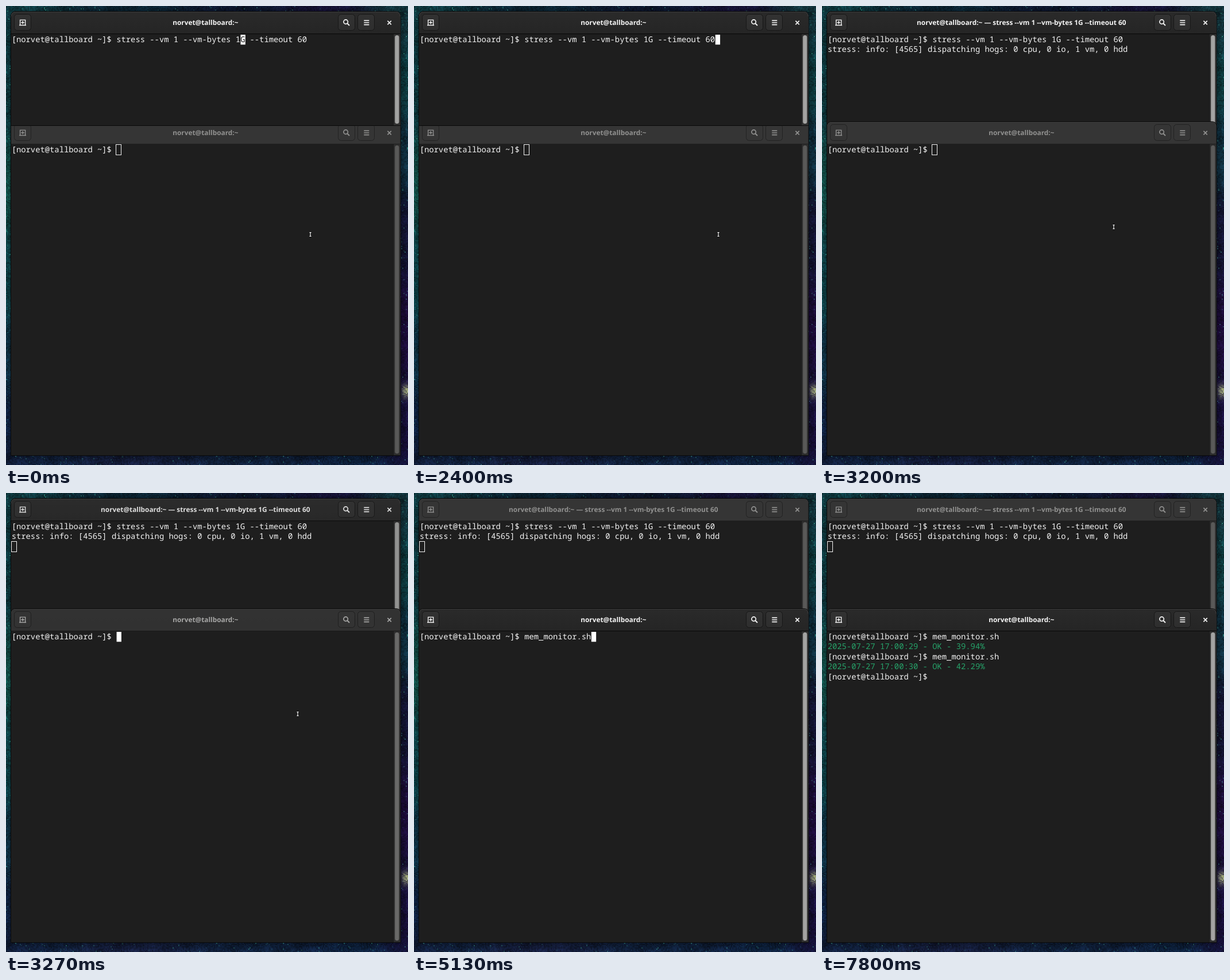
An HTML page with a canvas for the animation above (8000 ms loop, 700 by 800 pixels).

```html
<!DOCTYPE html>
<html lang="en">
<head>
<meta charset="utf-8">
<title>Terminals</title>
<style>
html, body { margin: 0; width: 100%; height: 100%; overflow: hidden; background: #10182c; }
canvas, svg { position: absolute; left: 0; top: 0; width: 700px; height: 800px; display: block; }
text { white-space: pre; text-rendering: geometricPrecision; }
.mono { font: 13.84px "Noto Sans Mono", monospace; fill: #f4f4f4; }
.title { font: 700 11.85px "Noto Sans", sans-serif; text-anchor: middle; }
</style>
</head>
<body>
<canvas id="wall" width="700" height="800"></canvas>
<svg id="stage" viewBox="0 0 700 800">
  <defs>
    <linearGradient id="bar" x2="0" y2="1"><stop stop-color="#2a2a2a"/><stop offset="1" stop-color="#252525"/></linearGradient>
    <linearGradient id="btn" x2="0" y2="1"><stop stop-color="#323232"/><stop offset="1" stop-color="#2e2e2e"/></linearGradient>
  </defs>
  <g id="windows"></g>
  <g id="mouse">
    <path d="M-2 -3.5H2M0 -3.5V3.5M-2 3.5H2" stroke="#000" stroke-width="2.6" fill="none"/>
    <path d="M-1.6 -3.3H1.6M0 -3.3V3.3M-1.6 3.3H1.6" stroke="#fff" stroke-width="1.2" fill="none"/>
  </g>
</svg>
<script>
const LOOP = 8000, X0 = 9.7, CHAR = 8.304, LINE = 17.45, ROWS = 5;
const HOST = 'norvet@tallboard';
const PROMPT = `[${HOST} ~]$ `;
const STRESS = 'stress --vm 1 --vm-bytes 1G --timeout 60';
const MONITOR = 'mem_monitor.sh';
const INFO = 'stress: info: [4565] dispatching hogs: 0 cpu, 0 io, 1 vm, 0 hdd';
const START = PROMPT.length;

const layer = document.getElementById('windows');
const mouse = document.getElementById('mouse');
const clamp = v => Math.max(0, Math.min(1, v));

// Value of the last [time, value] step reached.
function at(steps, t) {
  let value = steps[0][1];
  for (const [time, v] of steps) if (t >= time) value = v;
  return value;
}

// Wallpaper: blended colour spots with seeded grain, visible around the windows.
function drawWall() {
  const ctx = document.getElementById('wall').getContext('2d');
  const spots = [
    [0, 0, 18, 72, 80], [0, 150, 16, 72, 80], [0, 310, 22, 98, 90], [0, 480, 16, 84, 92],
    [0, 620, 18, 62, 86], [0, 720, 18, 42, 82], [0, 795, 20, 36, 70], [200, 0, 14, 44, 62],
    [400, 0, 16, 28, 56], [560, 0, 26, 22, 64], [700, 0, 24, 66, 76], [700, 130, 16, 72, 78],
    [700, 260, 18, 56, 76], [700, 390, 22, 24, 62], [700, 560, 34, 14, 70], [700, 740, 28, 18, 70],
    [210, 800, 24, 34, 70], [450, 800, 18, 38, 70], [610, 800, 16, 40, 74]
  ];
  let seed = 71;
  const rnd = () => (seed = (seed * 16807) % 2147483647) / 2147483647;
  for (let y = 0; y < 800; y += 2) {
    for (let x = 0; x < 700; x += 2) {
      if (x > 9 && x < 685 && y > 11 && y < 782) continue;
      const c = [0, 0, 0];
      let sum = 0;
      for (const [sx, sy, ...rgb] of spots) {
        const w = 1 / (((x - sx) ** 2 + (y - sy) ** 2) ** 1.4 + 900);
        sum += w;
        rgb.forEach((v, i) => c[i] += v * w);
      }
      const wave = Math.sin(x * .11 + y * .07) * Math.sin(y * .13 - x * .05);
      const gap = Math.max(8 - x, x - 687, 10 - y, y - 784, 0);
      const light = (.62 + .4 * rnd() + .14 * wave) * (.72 + .026 * Math.min(gap, 12));
      const spark = rnd() > .965 ? rnd() * 65 : 0;
      const burst = Math.exp(-((x - 696) ** 2 / 60 + (y - 670) ** 2 / 130)) * (60 + 100 * rnd());
      const add = [spark * .35 + burst, spark + burst * 1.1, spark * .7 + burst * .55];
      ctx.fillStyle = `rgb(${c.map((v, i) => Math.round(v / sum * light + add[i]))})`;
      ctx.fillRect(x, y, 2, 2);
    }
  }
}

function button(x, y, active) {
  return `<rect x="${x}" y="${y + 4.5}" width="29" height="28" rx="5"
    fill="${active ? 'url(#btn)' : '#353535'}" stroke="${active ? '#171717' : '#222'}"/>`;
}

function chrome(y, h, active) {
  const ink = active ? '#f5f5f5' : '#919190';
  const edge = active ? '#3c3c3c' : '#3b3b3b';
  const mid = y + 19;
  return `
    <path d="M9 ${y + 38.5}V${y + 8}q0 -8 8 -8H678.5q8 0 8 8V${y + 38.5}z" fill="${active ? 'url(#bar)' : '#353535'}"/>
    <path d="M9.5 ${y + 8}q0 -7.5 7.5 -7.5H678.5q7.5 0 7.5 7.5" fill="none" stroke="${edge}"/>
    <path d="M9 ${y + 38.5}H686.5" stroke="${active ? '#070707' : '#202020'}"/>
    ${button(14.5, y, active)}${button(578.5, y, active)}${button(612.5, y, active)}
    <g fill="none" stroke="${ink}" stroke-width="1.4">
      <path d="M23 ${mid + 4.5}H35M24.6 ${mid + 4.5}V${mid - 4.6}H33.6V${mid + 4.5}M29.1 ${mid - 3}V${mid + 2.6}M26.3 ${mid - .2}H31.9"/>
      <circle cx="591.6" cy="${mid - 1.4}" r="3.7" stroke-width="1.7"/>
      <path d="M594.3 ${mid + 1.4}L598 ${mid + 5}" stroke-width="2"/>
      <path d="M623.3 ${mid - 3.6}h9M623.3 ${mid}h9M623.3 ${mid + 3.6}h9" stroke-width="1.7"/>
      <path d="M664.4 ${mid - 3.1}l6.4 6.4M670.8 ${mid - 3.1}l-6.4 6.4" stroke-width="1.7"/>
    </g>
    <text class="title" x="347.3" y="${mid + 4.2}" fill="${ink}"></text>
    <rect x="675" y="${y + 39}" width="11.5" height="${h - 39}" fill="${active ? '#303030' : '#2d2d2d'}"/>
    <path d="M674.5 ${y + 39}V${y + h}" stroke="#191919"/>
    <rect x="677.2" y="${y + 41}" width="7.2" height="${h - 44}" rx="3.6" fill="${active ? '#a3a3a2' : '#595958'}"/>`;
}

function makeWindow(y, h) {
  const g = document.createElementNS('http://www.w3.org/2000/svg', 'g');
  let rows = '';
  for (let i = 0; i < ROWS; i++) rows += `<text class="mono row" x="${X0}" y="${y + 53 + i * LINE}"></text>`;
  g.innerHTML = `
    <path d="M8.5 ${y + h + .5}V${y + 8}q0 -8.5 8.5 -8.5H678.5q8.5 0 8.5 8.5V${y + h + .5}z" fill="#1e1e1e" stroke="#0a0a0a"/>
    <g>${chrome(y, h, false)}</g>
    <g class="focus">${chrome(y, h, true)}</g>
    ${rows}
    <rect class="cursor"/>
    <text class="mono under" style="fill:#1e1e1e"></text>`;
  const one = s => g.querySelector(s), all = s => [...g.querySelectorAll(s)];
  return { g, y, focus: one('.focus'), titles: all('.title'), rows: all('.row'), cursor: one('.cursor'), under: one('.under') };
}

function attrs(el, map) {
  for (const k in map) el.setAttribute(k, map[k]);
}

function paint(win, { title, lines, row, col, on, focus, solid }) {
  win.focus.setAttribute('opacity', focus);
  win.titles.forEach(el => el.textContent = title);
  win.rows.forEach((el, i) => {
    const line = lines[i] || '';
    el.textContent = line;
    el.style.fill = line.startsWith('2025') ? '#26a269' : '';
  });
  const x = X0 + col * CHAR, y = win.y + 40 + row * LINE;
  attrs(win.cursor, solid
    ? { x: x + .2, y, width: CHAR, height: 17.3, fill: '#fff', stroke: 'none' }
    : { x: Math.round(x) - .5, y: Math.round(y) - .5, width: 9, height: 18, fill: 'none', stroke: '#f4f4f4' });
  win.cursor.setAttribute('visibility', on || !solid ? 'visible' : 'hidden');
  attrs(win.under, { x, y: win.y + 53 + row * LINE });
  win.under.textContent = on && solid ? (lines[row] || '')[col] || '' : '';
}

const upper = makeWindow(10, 198), lower = makeWindow(202, 581);

const caret = [[0, 26], [70, 27], [470, 28], [1000, 30], [1070, 33], [1130, 35], [1200, 38], [1270, 40]];
const upperBlink = [[0, true], [1930, false], [2400, true], [3130, false]];
const lowerBlink = [[0, true], [3800, false], [4400, true], [5800, false], [5930, true],
  [6670, false], [6730, true], [7800, false]];
const typed = [[0, ''], [4470, MONITOR.slice(0, 5)], [5130, MONITOR], [5930, ''], [6730, MONITOR], [7270, '']];
const history = [
  [5930, [PROMPT + MONITOR, '2025-07-27 17:00:29 - OK - 39.94%']],
  [7270, [PROMPT + MONITOR, '2025-07-27 17:00:30 - OK - 42.29%']]
];

function render(t) {
  const raised = t >= 3200, switched = t >= 3270;
  const top = raised ? lower : upper;
  if (layer.lastElementChild !== top.g) layer.append((raised ? upper : lower).g, top.g);

  const fade = clamp((t - 3220) / 230);
  const running = t >= 2470;
  paint(upper, {
    title: HOST + ':~' + (t >= 2600 ? ' — ' + STRESS : ''),
    lines: running ? [PROMPT + STRESS, INFO] : [PROMPT + STRESS],
    row: running ? 2 : 0,
    col: running ? 0 : START + at(caret, t),
    on: at(upperBlink, t), focus: 1 - fade, solid: !switched
  });

  const done = history.filter(([time]) => t >= time).flatMap(([, lines]) => lines);
  const input = at(typed, t);
  paint(lower, {
    title: HOST + ':~',
    lines: [...done, PROMPT + input],
    row: done.length, col: START + input.length,
    on: at(lowerBlink, t), focus: fade, solid: switched
  });

  const move = clamp((t - 2865) / 335);
  mouse.setAttribute('transform', `translate(${530 - 22 * move} ${398 - 13 * move})`);
  mouse.setAttribute('visibility', t < 3330 ? 'visible' : 'hidden');
}

drawWall();
const begin = performance.now();
function tick() {
  render((performance.now() - begin) % LOOP);
  requestAnimationFrame(tick);
}
tick();
</script>
</body>
</html>
```
